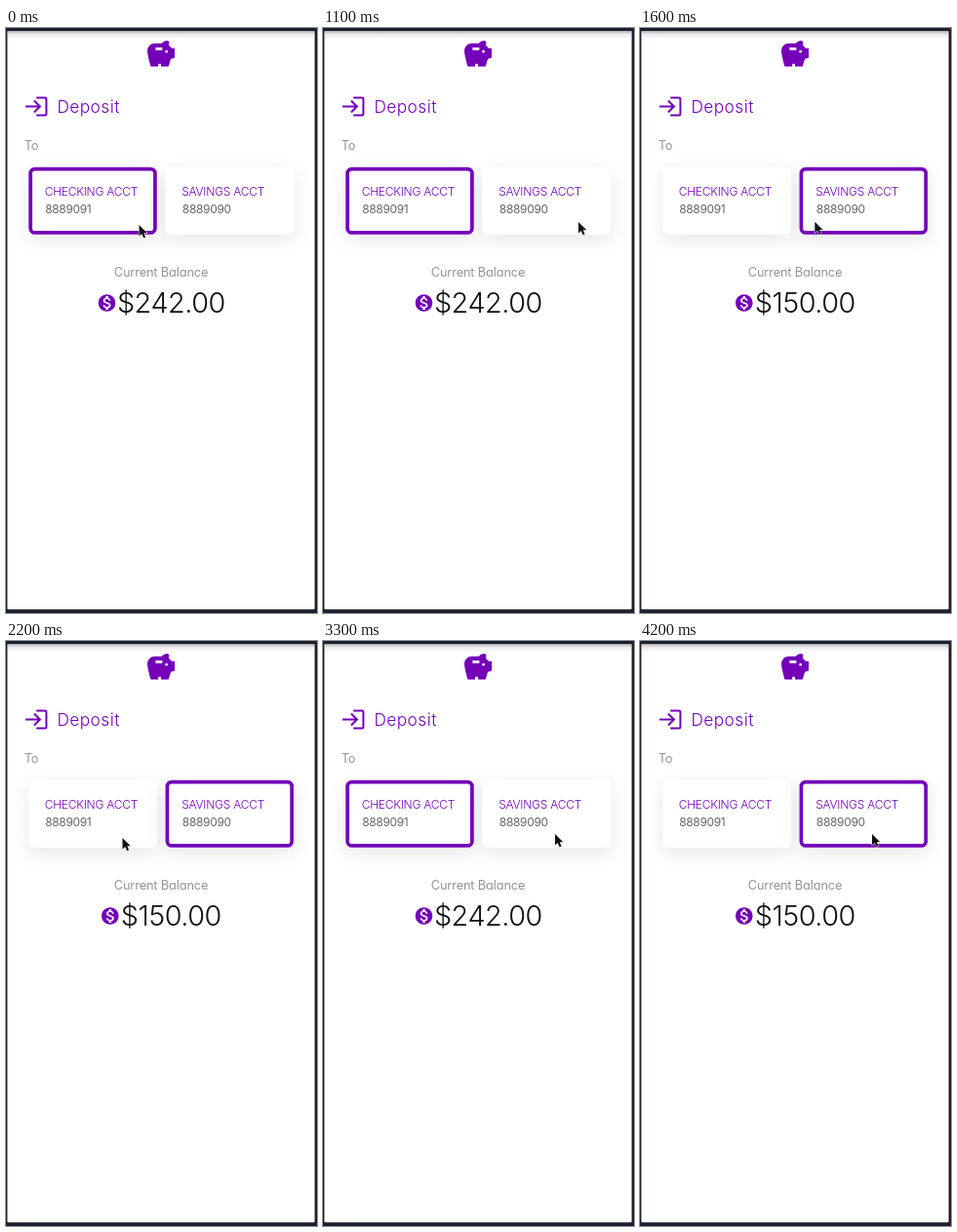
Animation of 319 by 600 pixels, one loop 4.3 s. Source, as an HTML page:

```html
<!DOCTYPE html>
<html lang="en">
<head>
<meta charset="utf-8">
<title>Deposit</title>
<style>
  html, body { margin: 0; width: 100%; height: 100%; overflow: hidden; background: #fff; }
  svg { display: block; width: 319px; height: 600px; }
  text {
    font-family: Inter, sans-serif; font-weight: 300; font-size: 12px;
    font-feature-settings: "cv11"; letter-spacing: -.25px; text-anchor: middle;
  }
  .purple { fill: #7400b8; }
  .number { fill: #666; font-weight: 400; letter-spacing: -.35px; }
  .label { fill: #949494; font-size: 12.8px; font-weight: 400; letter-spacing: -.15px; }
  .heading { font-size: 17.3px; font-weight: 350; letter-spacing: .45px; }
  .amount { font-size: 28.8px; font-weight: 350; letter-spacing: -.45px; }
  .card { fill: #fff; filter: drop-shadow(0 6px 10px rgba(0, 0, 0, .09)); }
  .ring, .enter { fill: none; stroke: #7400b8; }
  .ring { stroke-width: 3.7; }
  .enter { stroke-width: 2; }
</style>
</head>
<body>
<svg viewBox="0 0 319 600">
  <defs>
    <linearGradient id="shade" x2="0" y2="1">
      <stop stop-color="#777a84" stop-opacity=".6"/>
      <stop offset=".4" stop-color="#999" stop-opacity=".18"/>
      <stop offset="1" stop-color="#999" stop-opacity="0"/>
    </linearGradient>
  </defs>
  <rect width="319" height="600" fill="#1c2030"/>
  <rect x="1.4" y="3" width="315.2" height="593.2" rx="1" fill="#fff"/>
  <rect x="1.4" y="3" width="315.2" height="9" fill="url(#shade)"/>

  <path class="purple" fill-rule="evenodd" transform="translate(142.2 10.2) scale(1.4)" d="M19.83 7.5 17.56 5.23C17.63 4.81 17.74 4.42 17.88 4.08 17.96 3.9 18 3.71 18 3.5 18 2.67 17.33 2 16.5 2 14.86 2 13.41 2.79 12.5 4H7.5C4.46 4 2 6.46 2 9.5 2 12.54 4.5 21 4.5 21H10V19H12V21H17.5L19.18 15.41 22 14.47V7.5ZM13 9H8V7H13ZM16 11a1 1 0 1 1 0-2 1 1 0 0 1 0 2Z"/>

  <path class="enter" d="M20 80.5H34.5M28.9 74.5 34.9 80.5 28.9 86.5M31.2 71.5H40.2Q41.4 71.5 41.4 72.7V88.3Q41.4 89.5 40.2 89.5H31.2"/>
  <text class="purple heading" x="84.6" y="86.5">Deposit</text>
  <text class="label" x="26" y="124.8">To</text>

  <rect class="card" x="23" y="142.5" width="132" height="69.5" rx="6"/>
  <rect class="card" x="163.3" y="142.5" width="132" height="69.5" rx="6"/>
  <rect class="ring" id="ring" y="144.6" width="127.8" height="65.3" rx="4.5"/>
  <text class="purple" x="87.4" y="172.3">CHECKING ACCT</text>
  <text class="number" x="63.8" y="190">8889091</text>
  <text class="purple" x="222.6" y="172.3">SAVINGS ACCT</text>
  <text class="number" x="205.8" y="190">8889090</text>

  <text class="label" x="159" y="254.5">Current Balance</text>
  <path class="purple" id="coin" d="M12 2C6.48 2 2 6.48 2 12s4.48 10 10 10 10-4.48 10-10S17.52 2 12 2zm1.41 16.09V20h-2.67v-1.93c-1.71-.36-3.16-1.46-3.27-3.4h1.96c.1 1.05.82 1.87 2.65 1.87 1.96 0 2.4-.98 2.4-1.59 0-.83-.44-1.61-2.67-2.14-2.48-.6-4.18-1.62-4.18-3.67 0-1.72 1.39-2.84 3.11-3.21V4h2.67v1.95c1.86.45 2.79 1.86 2.85 3.39H14.3c-.05-1.11-.64-1.87-2.22-1.87-1.5 0-2.4.68-2.4 1.64 0 .84.65 1.39 2.67 1.91s4.18 1.39 4.18 3.91c-.02 1.83-1.38 2.83-3.12 3.16z"/>
  <text class="amount" id="amount" x="169.4" y="292.2" fill="#111"></text>

  <path id="cursor" d="M0 1V12.6L2.7 10 4.6 14.3 6.6 13.4 4.8 9.3H8.3Z" fill="#111" stroke="#fff" stroke-width="1" paint-order="stroke"/>
</svg>
<script>
  const LOOP = 4300, STEP = 100;
  const [ring, coin, amount, cursor] =
    ["ring", "coin", "amount", "cursor"].map(id => document.getElementById(id));

  const easeInOut = p => p * p * (3 - 2 * p);
  const easeOut = p => 1 - (1 - p) ** 2.14;

  // Each move bends vertically by `bend` at its midpoint.
  const moves = [
    { start: 0, end: 500, from: [136.5, 201], to: [262, 198], bend: 5, ease: easeInOut },
    { start: 1400, end: 2000, from: [262, 198], to: [119.5, 201], bend: -2, ease: easeOut },
    { start: 2800, end: 3300, from: [119.5, 201], to: [238, 197], bend: 0, ease: easeInOut },
  ];

  function cursorAt(t) {
    const { start, end, from, to, bend, ease } = moves.findLast(m => t >= m.start);
    const p = ease(Math.min(1, (t - start) / (end - start)));
    const mix = i => from[i] + (to[i] - from[i]) * p;
    return [mix(0), mix(1) + bend * 4 * p * (1 - p)];
  }

  function draw(now) {
    const t = Math.floor(now % LOOP / STEP) * STEP;
    const savings = (t >= 1200 && t < 2500) || t >= 3800;
    ring.setAttribute("x", savings ? 165.4 : 25.1);
    coin.setAttribute("transform", `translate(${savings ? 96.3 : 93} 271.5) scale(.875)`);
    amount.textContent = savings ? "$150.00" : "$242.00";
    cursor.setAttribute("transform", `translate(${cursorAt(t)})`);
    requestAnimationFrame(draw);
  }
  draw(performance.now());
</script>
</body>
</html>
```
